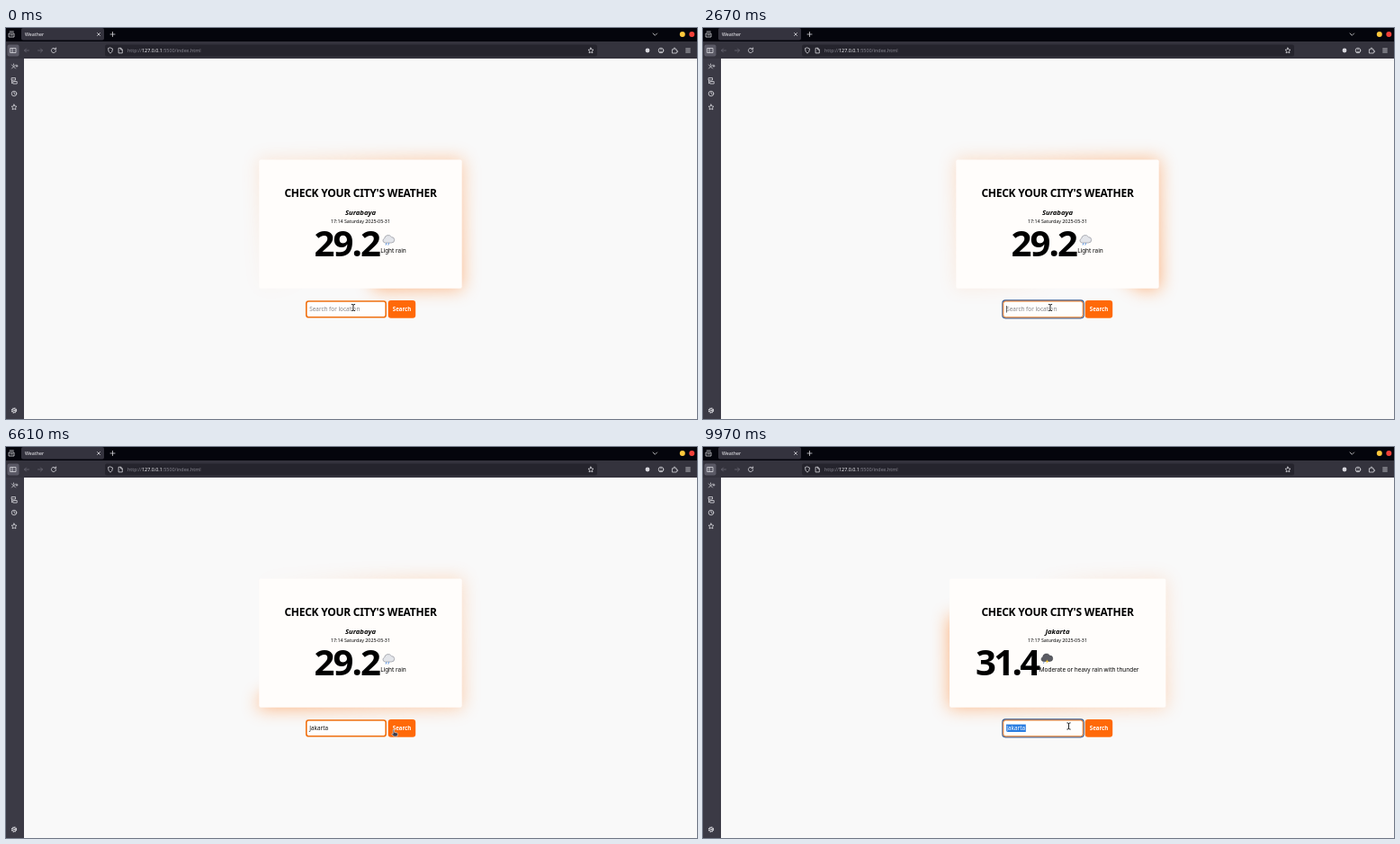
An HTML page for the animation above (10000 ms loop, 768 by 435 pixels).

```html
<!DOCTYPE html>
<html lang="en">
<head>
<meta charset="utf-8">
<title>Weather</title>
<style>
  html, body { margin: 0; width: 100%; height: 100%; overflow: hidden; background: #f9f9f9; }
  #glow { position: absolute; top: 145.3px; height: 146px; border-radius: 3px; filter: blur(9.6px); opacity: .5; }
  svg { position: absolute; left: 0; top: 0; }
  text { font: 6.4px "Noto Sans", "Open Sans", sans-serif; white-space: pre; }
  .mid { text-anchor: middle; }
  .icons { fill: none; stroke: #d8d8de; stroke-width: .8; stroke-linecap: round; stroke-linejoin: round; }
  #title { font-size: 12px; font-weight: 600; letter-spacing: -.25px; }
  #city { font-size: 7.7px; font-weight: 600; font-style: italic; }
  #date { font-size: 5.29px; }
  #degrees { font-size: 40px; font-weight: 800; }
</style>
</head>
<body>
<div id="glow"></div>
<svg width="768" height="435" viewBox="0 0 768 435">
  <!-- browser window -->
  <path fill="#04050c" d="M0 0H768V15H0z"/>
  <path fill="#34333d" d="M0 15H768V34H0z"/>
  <path fill="#3b3a45" d="M0 34H20V435H0z"/>
  <rect x="17" y="0" width="92" height="13.5" rx="2" fill="#34333e"/>
  <rect x="1.5" y="18.5" width="13" height="13" rx="2" fill="#5b5a66"/>
  <rect x="110" y="18.5" width="547" height="13" rx="2" fill="#25242d"/>
  <text x="21" y="9" fill="#f4f4f8" style="font-size:5.3px">Weather</text>
  <text x="135" y="27" fill="#85848e" style="font-size:5.4px">http://<tspan fill="#f4f4f8">127.0.0.1</tspan>:5500/index.html</text>
  <circle cx="751.8" cy="7" r="3" fill="#ffc93c"/>
  <circle cx="762.3" cy="7" r="3" fill="#f2413a"/>
  <circle cx="713" cy="25" r="2.4" fill="#d8d8de"/>
  <g class="icons">
    <path d="M3.5 6H9V10H3.5zM4.2 4H8.3M5 7.8H7.5"/>
    <path d="M101.5 5.5l3 3m0-3l-3 3M116 7h5M118.5 4.5v5M719 6l2.3 2.3L723.6 6"/>
    <path d="M5 22.5H11V27.5H5zM7 22.5v5"/>
    <path stroke="#6a6974" d="M25.5 25h-5m2-2l-2 2 2 2M35.5 25h5m-2-2l2 2-2 2"/>
    <path d="M55 23.3a2.6 2.6 0 1 0 .6 2M55.6 22v1.8h-1.8"/>
    <path d="M116 22l2.5 1q0 4-2.5 5.2-2.5-1.2-2.5-5.2z"/>
    <path d="M125.5 22.3h2.2l1.6 1.6v4h-3.8zM127.6 22.5v1.6h1.6"/>
    <path id="star" d="M650 22.1l.9 1.9 2.1.3-1.5 1.4.4 2.1-1.9-1-1.9 1 .4-2.1-1.5-1.4 2.1-.3z"/>
    <use href="#star" x="-641" y="63"/>
    <circle cx="728" cy="25" r="2.8"/><path d="M726.3 27q1.7-1.6 3.4 0M728 23.4v1"/>
    <path d="M740.8 23.8h1.4q-.4-1.8.8-1.8t.8 1.8h1.4v1.5q1.5-.3 1.5.8t-1.5.8v1.1h-4.4z"/>
    <path d="M755.7 23h4.6M755.7 25h4.6M755.7 27h4.6"/>
    <path d="M6.5 41l4 4m0-4l-4 4M12 41.2v2m-1-1h2M8.5 40v1"/>
    <path d="M6.5 55.5h4v2.5h-4zM8.2 59.5h4v2.5h-4zM6.5 58v3.5"/>
    <circle cx="9" cy="73" r="2.8"/><path d="M9 71.4V73l1.2.8"/>
    <circle cx="9" cy="425.5" r="2.6" stroke-width="1.1" stroke-dasharray="1.3 .74" stroke-linecap="butt"/>
    <circle cx="9" cy="425.5" r="2"/><circle cx="9" cy="425.5" r=".6"/>
  </g>

  <!-- weather card -->
  <rect id="card" y="146.5" height="143.3" rx="2" fill="#fffdfb"/>
  <text id="title" class="mid" x="394" y="188">CHECK YOUR CITY'S WEATHER</text>
  <text id="city" class="mid" x="394" y="208"></text>
  <text id="date" class="mid" x="394" y="217"></text>
  <text id="degrees" y="254"></text>
  <text id="sky" y="249.7"></text>
  <g id="rain" transform="translate(425 236)" stroke-linecap="round">
    <path d="M-4 3a2.5 2.5 0 0 1-.4-4.8A4.2 4.2 0 0 1 3.4-3.4 3.2 3.2 0 0 1 3.6 3z" fill="#e3e5ea" stroke="#92949c" stroke-width=".7"/>
    <path d="M-2.2 3.6l-.5 1.6M.4 3.6l-.5 1.6" stroke="#4a8be0" stroke-width=".9"/>
  </g>
  <g id="thunder" transform="translate(382 235.5)" stroke-linecap="round">
    <path d="M-4 3a2.5 2.5 0 0 1-.4-4.8A4.2 4.2 0 0 1 3.4-3.4 3.2 3.2 0 0 1 3.6 3z" fill="#5b5c63" stroke="#3f4046" stroke-width=".6"/>
    <path d="M1 .8l-2.2 2.6h1.4l-.8 2.4 2.8-3.3h-1.5z" fill="#f5c32c"/>
    <path d="M-3 3.8l-.4 1.2" stroke="#5b86c4" stroke-width=".8"/>
  </g>

  <!-- search form -->
  <rect id="ring" x="332.9" y="303" width="90.2" height="19.8" rx="3.2" fill="none" stroke="#3f5f91" stroke-width="1.3"/>
  <rect id="field" x="333.8" y="304" width="88.4" height="17.8" rx="2.6" fill="#fffefd" stroke="#f07010"/>
  <rect id="selection" x="337" y="308.6" width="21.8" height="8.4" fill="#2a7de1"/>
  <text id="entry" x="337.2" y="315"></text>
  <path id="caret" d="M0 309v7.6" stroke="#111" stroke-width=".7"/>
  <rect x="424.7" y="303" width="30.5" height="19.8" rx="3.2" fill="#ff6908"/>
  <text class="mid" x="440" y="315.1" fill="#fff" style="font-size:6.1px;font-weight:600">Search</text>

  <g id="beam" fill="none" stroke-linecap="round">
    <path id="beamShape" d="M-1.7-3.6Q0-3.6 0-2.8 0-3.6 1.7-3.6M0-2.8V2.8M-1.7 3.6Q0 3.6 0 2.8 0 3.6 1.7 3.6" stroke="#fff" stroke-width="2"/>
    <use href="#beamShape" style="stroke:#222"/>
    <path d="M-1.7-3.6Q0-3.6 0-2.8 0-3.6 1.7-3.6M0-2.8V2.8M-1.7 3.6Q0 3.6 0 2.8 0 3.6 1.7 3.6" stroke="#222" stroke-width="1"/>
  </g>
  <path id="hand" d="M-1.8-3.5q.8-.8 1.4 0V-.6l2.8.6q1.2.3 1 1.4l-.6 2.6h-3.6L-3.4 1.4q.2-1 1.6-.1z" fill="#3b3b48" stroke="#e8e8ee" stroke-width=".6"/>
</svg>
<script>
const LOOP = 10000;
const FOCUS = 600, TYPE = 3700, KEY = 150, CLICK = 6450, RESULT = 7300, REFOCUS = 8400, SELECT = 9500;
const WORD = "Jakarta";
const TYPED = TYPE + KEY * (WORD.length - 1);
const places = [
  { city: "Surabaya", date: "17:14 Saturday 2025-05-31", degrees: "29.2", spacing: -1.9, x: 342.5,
    sky: "Light rain", skyX: 416.2, left: 281.3, width: 225.4 },
  { city: "Jakarta", date: "17:17 Saturday 2025-05-31", degrees: "31.4", spacing: -2.6, x: 303,
    sky: "Moderate or heavy rain with thunder", skyX: 373.8, left: 274, width: 240.4 }
];
// pointer stops: time, x, y
const path = [[0, 386, 311], [5100, 386, 311], [6000, 432, 318], [6900, 432, 318],
  [7500, 434, 322], [8200, 406.5, 310.5], [LOOP, 406.5, 310.5]];

const $ = id => document.getElementById(id);
const show = (id, on) => $(id).setAttribute("visibility", on ? "visible" : "hidden");
const set = (id, attrs) => { for (const k in attrs) $(id).setAttribute(k, attrs[k]); };

function pointerAt(t) {
  const i = path.findIndex(p => p[0] > t);
  const [t0, x0, y0] = path[i - 1], [t1, x1, y1] = path[i];
  const u = (t - t0) / (t1 - t0), e = u * u * (3 - 2 * u);
  return [x0 + (x1 - x0) * e, y0 + (y1 - y0) * e];
}

function drawCard(t) {
  const found = t >= RESULT, p = places[+found];
  $("city").textContent = p.city;
  $("date").textContent = p.date;
  $("degrees").textContent = p.degrees;
  $("sky").textContent = p.sky;
  set("degrees", { x: p.x, "letter-spacing": p.spacing });
  set("sky", { x: p.skyX });
  set("card", { x: p.left, width: p.width });
  show("rain", !found);
  show("thunder", found);
  const glow = $("glow").style;
  glow.left = p.left - 1.2 + "px";
  glow.width = p.width + 2.4 + "px";
  glow.background = `conic-gradient(from ${168 + t * .12}deg, transparent 15%, #ff6a00)`;
}

function drawForm(t) {
  const count = t < TYPE ? 0 : Math.min(WORD.length, 1 + Math.floor((t - TYPE) / KEY));
  const focused = t >= FOCUS && t < CLICK || t >= REFOCUS;
  const selected = t >= SELECT;
  const entry = $("entry");
  entry.textContent = count ? WORD.slice(0, count) : "Search for location";
  entry.setAttribute("fill", selected ? "#fff" : count ? "#111" : "#85858a");
  show("ring", focused);
  set("field", { "stroke-width": focused ? .9 : 1.6 });
  show("selection", selected);

  const since = t >= REFOCUS ? REFOCUS : t >= TYPED ? TYPED : t >= TYPE ? t : FOCUS;
  show("caret", focused && !selected && (t - since) % 1000 < 500);
  const caretX = 337.4 + (count ? entry.getComputedTextLength() + .3 : 0);
  set("caret", { transform: `translate(${caretX} 0)` });
}

function drawPointer(t) {
  const [x, y] = pointerAt(t);
  const visible = t < TYPE || t >= 5100, onButton = x > 424.7;
  for (const id of ["beam", "hand"]) set(id, { transform: `translate(${x} ${y})` });
  show("beam", visible && !onButton);
  show("hand", visible && onButton);
}

const start = performance.now();
function frame() {
  const t = (performance.now() - start) % LOOP;
  drawCard(t);
  drawForm(t);
  drawPointer(t);
  requestAnimationFrame(frame);
}
frame();
</script>
</body>
</html>
```
